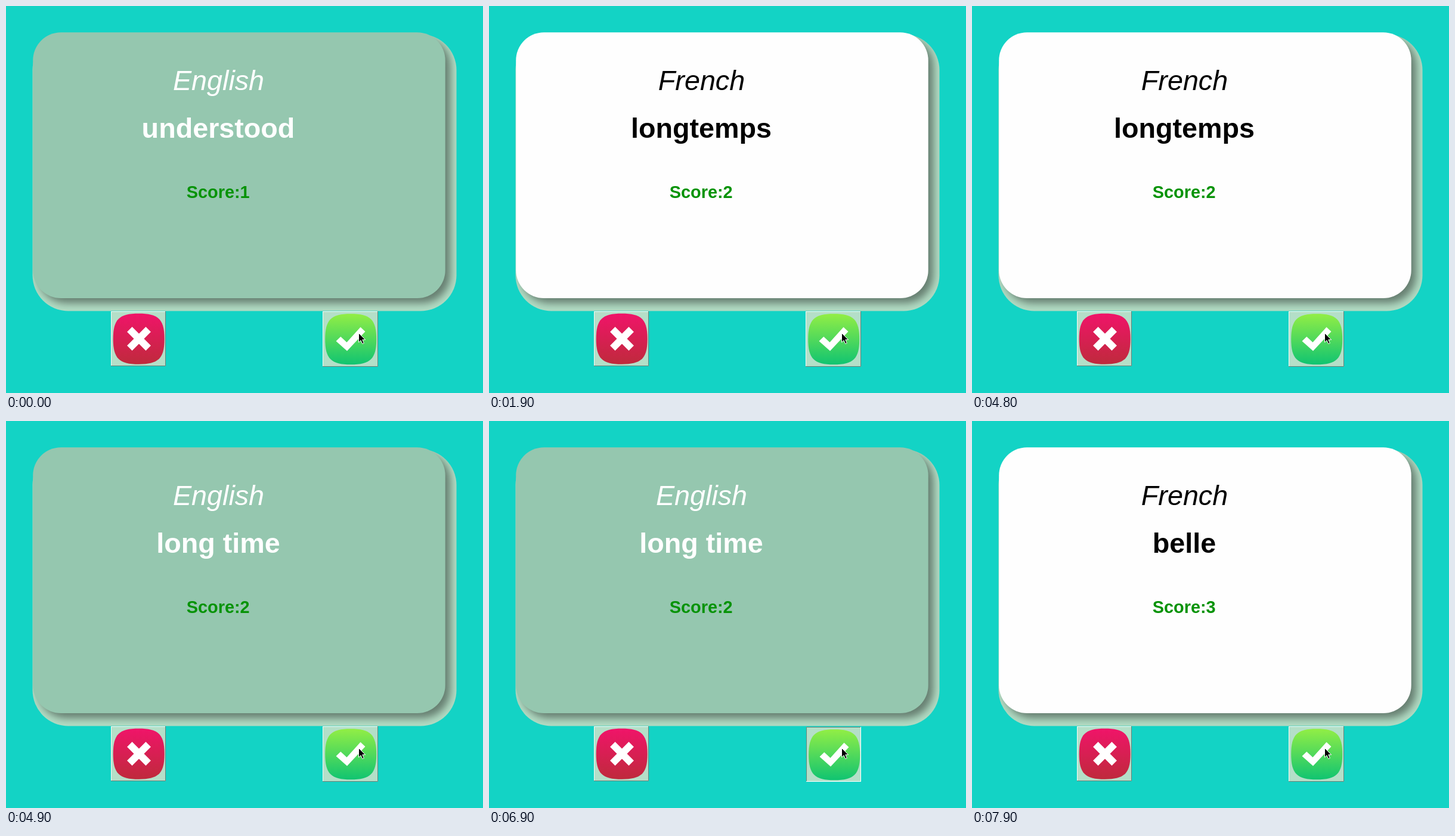
Recreate the animation shown at these times as an HTML page. Size 800 by 649 pixels, loop 8 s.

```html
<!DOCTYPE html>
<html lang="en">
<head>
<meta charset="utf-8">
<title>Flash cards</title>
<style>
  html, body { margin: 0; width: 100%; height: 100%; overflow: hidden; background: #13d3c5; }
  svg { display: block; width: 800px; height: 649px; }
  text { font-family: "Liberation Sans", Arial, sans-serif; font-size: 46.7px; text-anchor: middle; }
  #lang { font-style: italic; }
  #word { font-weight: bold; }
  #score { font-weight: bold; font-size: 28.9px; fill: #079307; }
</style>
</head>
<body>
<svg viewBox="0 0 800 649">
  <defs>
    <linearGradient id="red" x2="0" y2="1">
      <stop offset="0" stop-color="#f01469"/>
      <stop offset="1" stop-color="#bf2a3c"/>
    </linearGradient>
    <linearGradient id="green" x2="0" y2="1">
      <stop offset="0" stop-color="#92ee45"/>
      <stop offset="1" stop-color="#10c471"/>
    </linearGradient>
    <filter id="blur" x="-10%" y="-10%" width="120%" height="120%">
      <feGaussianBlur stdDeviation="6.5"/>
    </filter>
    <clipPath id="tray"><rect x="44.5" y="47.5" width="711" height="464" rx="60"/></clipPath>
  </defs>

  <g clip-path="url(#tray)">
    <rect width="800" height="649" fill="#b1dbc3"/>
    <rect x="53.5" y="52.5" width="692" height="446" rx="48" fill="#000" fill-opacity=".42" filter="url(#blur)"/>
  </g>
  <rect id="card" x="45.2" y="44.2" width="691.5" height="445.8" rx="47"/>
  <text id="lang" x="356.5" y="141"></text>
  <text id="word" x="356" y="221"></text>
  <text id="score" x="355.7" y="322"></text>

  <g id="wrong"></g>
  <g id="right"></g>
  <path transform="translate(591.5 548.5)" d="M0 0V15.5L3.6 12.2L6.2 18L8.8 16.9L6.3 11.2H11.2Z"
        fill="#000" stroke="#fff" stroke-width="1"/>
</svg>
<script>
const LOOP = 8000;
const $ = id => document.getElementById(id);

const sides = {
  French: { card: '#fefefe', ink: '#000' },
  English: { card: '#95c7af', ink: '#fff' }
};

// start time, language, word, score
const steps = [
  [0, 'English', 'understood', 1],
  [1900, 'French', 'longtemps', 2],
  [4900, 'English', 'long time', 2],
  [7000, 'French', 'belle', 3]
];
const presses = [[1800, 1900], [6900, 7000]];

function squircle(cx, cy, rx, ry) {
  const k = 0.77, a = rx * k, b = ry * k;
  return `M${cx - rx} ${cy}` +
    `C${cx - rx} ${cy - b} ${cx - a} ${cy - ry} ${cx} ${cy - ry}` +
    `S${cx + rx} ${cy - b} ${cx + rx} ${cy}` +
    `S${cx + a} ${cy + ry} ${cx} ${cy + ry}` +
    `S${cx - rx} ${cy + b} ${cx - rx} ${cy}Z`;
}

function button(x, y, size, fill, icon, down) {
  const [lit, dark] = down ? ['#6b8577', '#fff'] : ['#f4fbf7', '#6b7f76'];
  const shift = down ? 1 : 0;
  const left = x + shift, top = y + shift, right = x + size, bottom = y + size;
  const mid = size / 2;
  return `<path d="M${left} ${top}H${right}V${bottom}H${left}Z" fill="#b4dfc8"/>
    <path d="M${left + .5} ${bottom}V${top + .5}H${right}" fill="none" stroke="${lit}"/>
    <path d="M${left} ${bottom - .5}H${right - .5}V${top}" fill="none" stroke="${dark}"/>
    <g transform="translate(${shift} ${shift})">
      <path d="${squircle(x + mid + .7, y + mid + .2, 43, 42.5)}" fill="url(#${fill})"/>
      ${icon}
    </g>`;
}

const cross = '<path d="M207.3 542.3L238.7 573.7M238.7 542.3L207.3 573.7" stroke="#fff" stroke-width="12"/>';
const tick = '<path d="M553.5 562L561.3 554.5L571.5 564L594.5 538.5L602.5 546L572 578.5Z" fill="#fff"/>';

$('wrong').innerHTML = button(176, 512, 92, 'red', cross, false);

let shown = '';
function draw(t) {
  const [, lang, word, score] = steps.filter(s => s[0] <= t).pop();
  const down = presses.some(([a, b]) => t >= a && t < b);
  const key = word + down;
  if (key === shown) return;
  shown = key;
  const side = sides[lang];
  $('card').setAttribute('fill', side.card);
  for (const id of ['lang', 'word']) $(id).setAttribute('fill', side.ink);
  $('lang').textContent = lang;
  $('word').textContent = word;
  $('score').textContent = 'Score:' + score;
  $('right').innerHTML = button(531, 512, 93, 'green', tick, down);
}

const start = performance.now();
function frame() {
  draw((performance.now() - start) % LOOP);
  requestAnimationFrame(frame);
}
frame();
</script>
</body>
</html>
```
